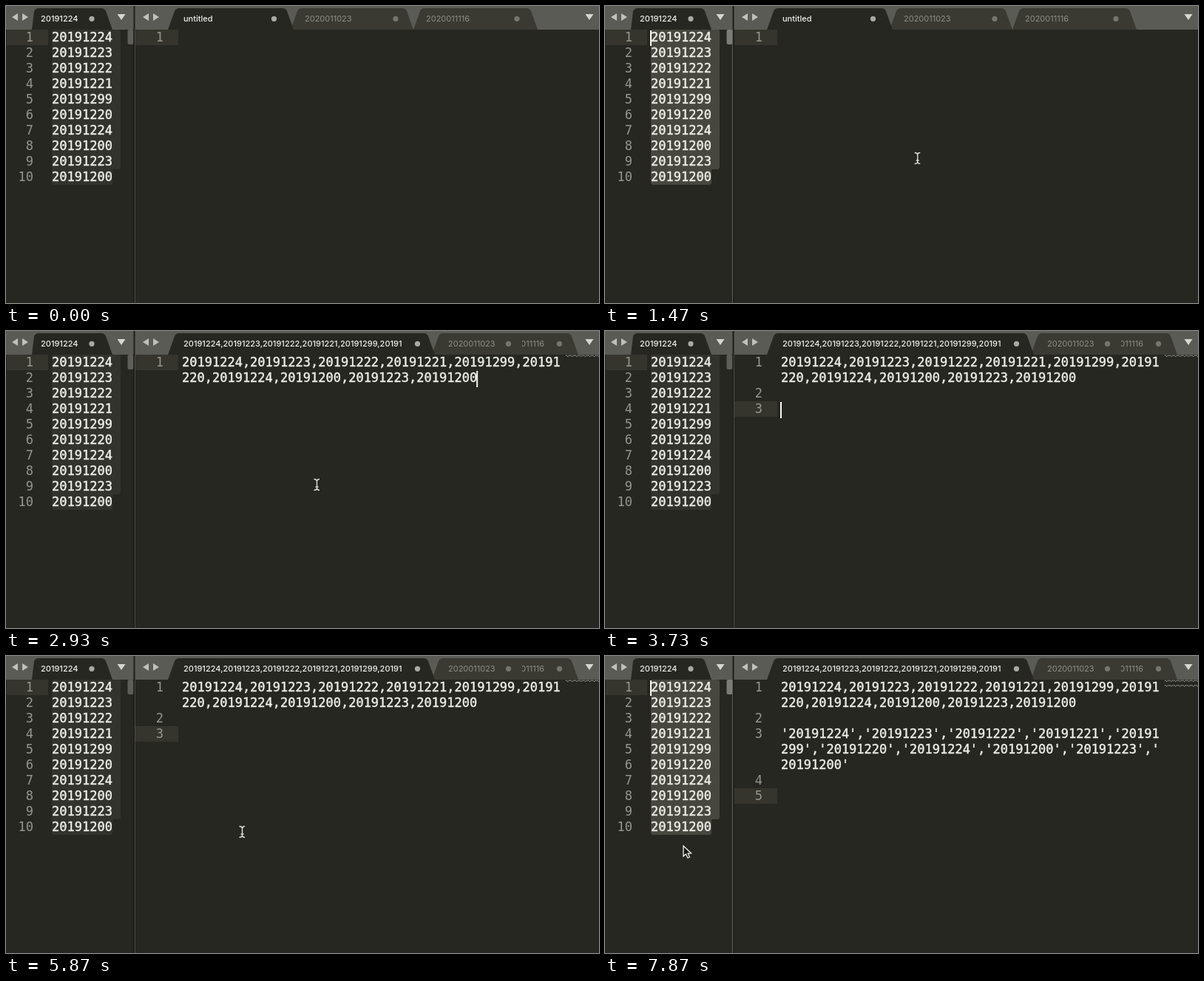
These frames come from a looping animation (802x402 px, 8000 ms). An HTML page with a canvas:

```html
<!DOCTYPE html>
<html lang="en">
<head>
<meta charset="utf-8">
<title>Editor</title>
<style>
html, body { margin: 0; width: 100%; height: 100%; overflow: hidden; background: #262721; }
canvas { display: block; }
</style>
</head>
<body>
<canvas id="stage" width="802" height="402"></canvas>
<script>
const ctx = document.getElementById('stage').getContext('2d');
const LOOP = 8000, ROW = 21, TOP = 32, WRAP = 50, SPLIT = 174;
const MONO = '17px "DejaVu Sans Mono", monospace';
const C = {
  bg: '#262721', bar: '#5a5b55', tab: '#3a3a33', line: '#35352d',
  text: '#eeeee8', number: '#95968f', dimText: '#8d8e87', icon: '#c0c1bb'
};
const values = ['24', '23', '22', '21', '99', '20', '24', '00', '23', '00'].map(d => '201912' + d);
const plain = values.join(',');
const quoted = values.map(v => `'${v}'`).join(',');

const within = (t, a, b) => t >= a && t < b;
const clamp = x => Math.min(1, Math.max(0, x));
const ease = x => x * x * (3 - 2 * x);
const rowY = i => TOP + ROW * i;

// Pointer journeys: start, end, then points along the way.
const journeys = [
  [330, 730, [384, 341], [81, 257]],
  [1130, 1560, [81, 257], [427, 202], [420, 208]],
  [4130, 4540, [394, 212], [135, 245]],
  [4870, 5330, [135, 245], [357, 228], [319, 238]],
  [7470, 7840, [286, 237], [106, 257]]
];
const pointerHidden = t => t < 330 || within(t, 3200, 4130) || within(t, 6600, 7470);
const leftFocused = t => within(t, 870, 1500) || within(t, 4600, 5220) || t >= 7870;

// Caret in the right pane: on, off, row, column, fade in, fade out.
const carets = [
  [1500, 2200, 0, 0, 0, 330],
  [2530, 2930, 0, 0, 200, 0],
  [2930, 3200, 1, 39, 0, 0],
  [3200, 3730, 2, 0, 0, 0],
  [3730, 4130, 3, 0, 0, 0],
  [5220, 5870, 3, 0, 0, 200],
  [6200, 6600, 5, 9, 0, 0],
  [6600, 7070, 6, 0, 0, 0],
  [7070, 7330, 7, 0, 0, 0]
];

function rect(color, x, y, w, h, radii) {
  ctx.fillStyle = color;
  ctx.beginPath();
  ctx.roundRect(x, y, w, h, radii || 0);
  ctx.fill();
}

function poly(color, ...points) {
  ctx.fillStyle = color;
  ctx.beginPath();
  points.forEach(([x, y]) => ctx.lineTo(x, y));
  ctx.closePath();
  ctx.fill();
}

function code(text, x, row) {
  ctx.font = MONO;
  ctx.textAlign = 'left';
  ctx.textBaseline = 'alphabetic';
  ctx.fillStyle = ctx.strokeStyle = C.text;
  ctx.lineWidth = 0.45;
  ctx.fillText(text, x, rowY(row) + 16);
  ctx.strokeText(text, x, rowY(row) + 16);
}

function lineNumber(n, right, row) {
  ctx.font = MONO;
  ctx.textAlign = 'right';
  ctx.textBaseline = 'alphabetic';
  ctx.fillStyle = C.number;
  ctx.fillText(n, right, rowY(row) + 16);
}

function tab(left, right, active, slant = 11) {
  const y = 3;
  ctx.fillStyle = active ? C.bg : C.tab;
  ctx.beginPath();
  ctx.moveTo(left, TOP);
  ctx.lineTo(left + slant - 2, y + 4);
  ctx.quadraticCurveTo(left + slant, y, left + slant + 4, y);
  ctx.lineTo(right - 15, y);
  ctx.quadraticCurveTo(right - 11, y, right - 9, y + 4);
  ctx.lineTo(right, TOP);
  ctx.fill();
}

function tabLabel(text, x, dotX, active) {
  ctx.font = `${active ? 500 : 400} 11px Inter, sans-serif`;
  ctx.textAlign = 'left';
  ctx.textBaseline = 'alphabetic';
  ctx.fillStyle = active ? '#f0f0ec' : C.dimText;
  ctx.fillText(text, x, 21);
  ctx.fillStyle = active ? '#a9aaa4' : '#74756e';
  ctx.beginPath();
  ctx.arc(dotX, 17.3, 3.6, 0, 7);
  ctx.fill();
}

function barIcons(x, menuX) {
  poly(C.icon, [x, 15], [x + 8, 10], [x + 8, 20]);
  poly(C.icon, [x + 22, 15], [x + 14, 10], [x + 14, 20]);
  poly('#d6d6d0', [menuX - 5.5, 11], [menuX + 5.5, 11], [menuX, 19]);
}

function leftPane(focused) {
  rect(C.line, 1, TOP, 56, ROW);
  const selection = focused ? '#47473f' : '#32332d';
  rect(selection, 62, TOP, 93, ROW * 9, [2, 2, 3, 0]);
  rect(selection, 62, rowY(9), 82, ROW, [0, 0, 3, 3]);
  values.forEach((value, i) => {
    lineNumber(i + 1, 37, i);
    code(value, 62, i);
  });
  rect(focused ? '#7b7c75' : '#5d5e58', 164.5, TOP, 8, 20, 2);
  if (focused) rect('#f8f8f2', 61, TOP + 1, 2, 21);
}

function leftBar() {
  rect(C.bar, 0, 0, SPLIT, TOP);
  tab(35, 144, true, 5);
  tabLabel('20191224', 47, 116, true);
  barIcons(8, 156);
}

function rightBar(pasted) {
  rect(C.bar, SPLIT, 0, 802 - SPLIT, TOP);
  if (pasted) {
    tab(640, 774, false);
    tab(576, 704, false);
    ctx.save();
    ctx.beginPath();
    ctx.rect(698, 0, 104, TOP);
    ctx.clip();
    tabLabel('2020011116', 669, 748.5, false);
    ctx.restore();
    tabLabel('2020011023', 598, 679.5, false);
    tab(219, 580, true);
    tabLabel(plain.slice(0, WRAP), 240, 556.5, true);
  } else {
    tab(551, 719, false);
    tab(385, 551, false);
    tab(219, 389, true);
    tabLabel('2020011116', 568, 691, false);
    tabLabel('2020011023', 404, 527, false);
    tabLabel('untitled', 240, 362.5, true);
  }
  barIcons(185, 789);
}

function wrapped(text, firstRow) {
  for (let i = 0; i * WRAP < text.length; i++)
    code(text.slice(i * WRAP, (i + 1) * WRAP), 238, firstRow + i);
}

function minimapLine(y) {
  for (let x = 757; x < 802; x += 2)
    rect('#8b8c85', x, y + (x % 3 ? 0 : 1), 1.4, 1.5);
}

function rightPane(t) {
  const numberRows = [0];
  if (t >= 3200) numberRows.push(2);
  if (t >= 3730) numberRows.push(3);
  if (t >= 6600) numberRows.push(6);
  if (t >= 7070) numberRows.push(7);

  const current = numberRows[numberRows.length - 1];
  rect(C.line, SPLIT + 1, rowY(current), 58, ROW);
  numberRows.forEach((row, i) => lineNumber(i + 1, 213, row));

  if (t >= 2930) {
    wrapped(plain, 0);
    minimapLine(32.5);
  }
  if (t >= 6200) {
    wrapped(quoted, 3);
    minimapLine(39);
  }
  ctx.font = MONO;
  const charWidth = ctx.measureText('0').width;
  for (const [on, off, row, column, fadeIn, fadeOut] of carets) {
    if (!within(t, on, off)) continue;
    ctx.globalAlpha = Math.min(
      fadeIn ? clamp((t - on + 50) / fadeIn) : 1,
      fadeOut ? clamp((off - t) / fadeOut) : 1
    );
    rect('#f8f8f2', 237 + column * charWidth, rowY(row) + 1, 2, 22);
    ctx.globalAlpha = 1;
  }
}

function pointerAt(t) {
  const [start, end, ...points] = journeys.filter(j => t >= j[0]).pop();
  const last = points.length - 1;
  const travel = clamp((t - start + 40) / (end - start + 40)) * last;
  const leg = Math.min(Math.floor(travel), last - 1);
  const k = ease(travel - leg);
  return [0, 1].map(i => points[leg][i] + (points[leg + 1][i] - points[leg][i]) * k);
}

function drawPointer(t) {
  if (pointerHidden(t)) return;
  const [x, y] = pointerAt(t);
  ctx.save();
  ctx.translate(x, y);
  if (x < SPLIT) {
    ctx.beginPath();
    [[0, 0], [0, 14], [3.5, 11], [6, 16.5], [8.5, 15.3], [6.2, 10.2], [10.5, 10]]
      .forEach(([px, py]) => ctx.lineTo(px, py));
    ctx.closePath();
    ctx.fillStyle = '#151612';
    ctx.fill();
    ctx.strokeStyle = '#f2f2ee';
    ctx.lineWidth = 1.3;
    ctx.stroke();
  } else {
    ctx.strokeStyle = '#dededa';
    ctx.lineWidth = 1.4;
    ctx.beginPath();
    for (const s of [-1, 1]) {
      ctx.moveTo(-3.5, 7.5 * s);
      ctx.quadraticCurveTo(0, 7.5 * s, 0.5, 5 * s);
      ctx.quadraticCurveTo(1, 7.5 * s, 4, 7.5 * s);
    }
    ctx.moveTo(0.5, -6);
    ctx.lineTo(0.5, 6);
    ctx.moveTo(-1.5, 3);
    ctx.lineTo(2.5, 3);
    ctx.stroke();
  }
  ctx.restore();
}

function draw(t) {
  const focused = leftFocused(t);
  rect(C.bg, 0, 0, 802, 402);
  leftPane(focused);
  rightPane(t);
  leftBar();
  rightBar(t >= 2930);
  rect('#1d1e19', 172.5, 0, 2, 402);
  rect(focused ? '#5f6059' : '#4a4b44', focused ? 172 : 174, TOP, 1, 370);
  drawPointer(t);
}

function tick() {
  draw(performance.now() % LOOP);
  requestAnimationFrame(tick);
}
tick();
</script>
</body>
</html>
```
